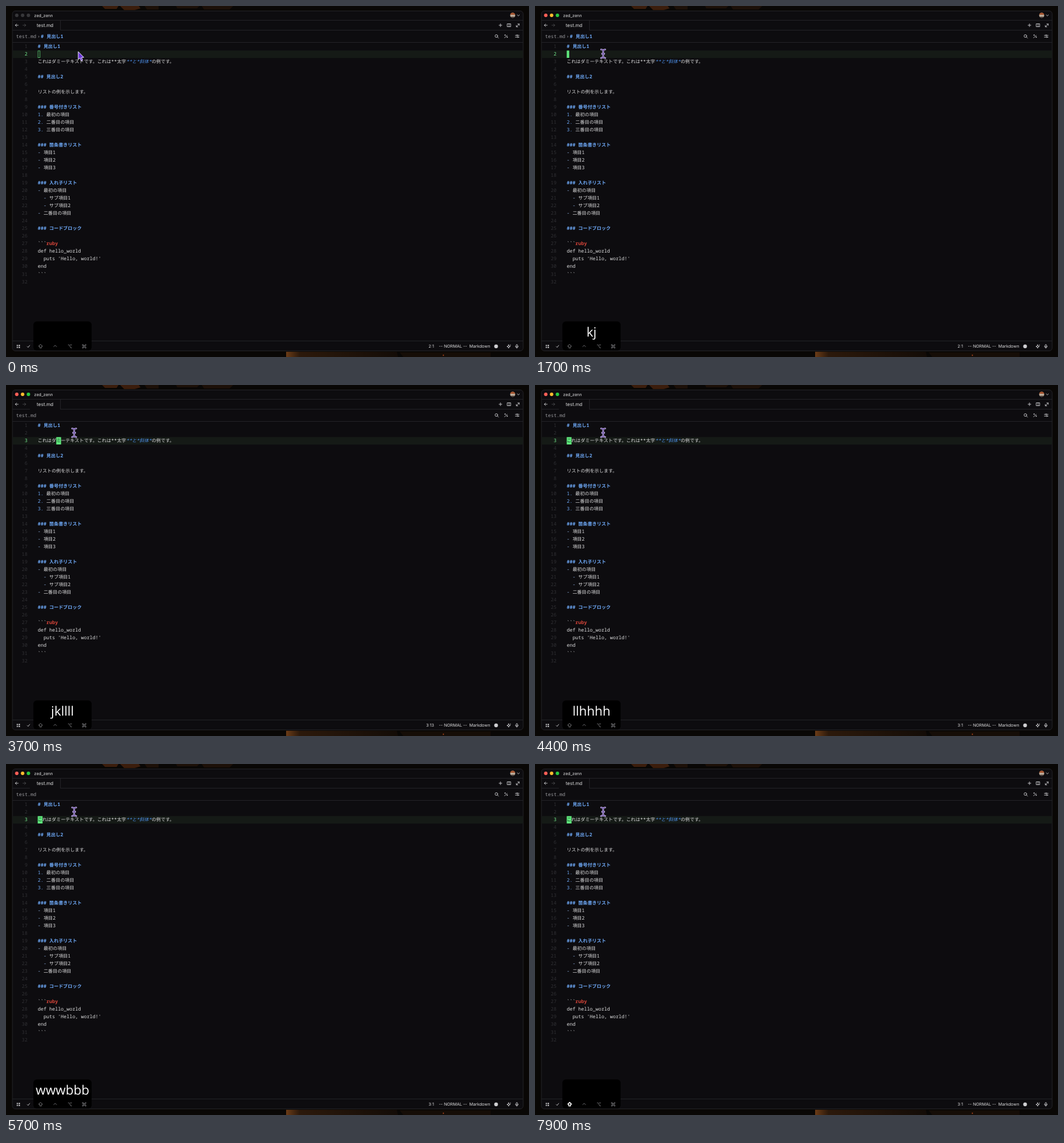
Recreate the animation shown at these times as an HTML page. Size 898 by 602 pixels, loop 8 s.

```html
<!DOCTYPE html>
<html lang="ja">
<head>
<meta charset="utf-8">
<title>Editor</title>
<style>
html, body { margin: 0; width: 100%; height: 100%; overflow: hidden; background: #090705; }
svg { display: block; width: 898px; height: 602px; }
text { white-space: pre; text-rendering: geometricPrecision; fill: #dededf; font: 7.2px Inter, sans-serif; }
.code { font: 8.25px "Noto Sans Mono", "Noto Sans CJK JP", monospace; }
.cjk { font-size: 7.95px; font-family: "Noto Sans CJK JP", "Noto Sans CJK", sans-serif; }
.head { fill: #6ea9f7; font-weight: 700; }
.mark { fill: #6ea9f7; }
.dash { fill: #92b4e4; }
.em { fill: #4d8fe8; font-style: italic; }
.lang { fill: #d6453a; font-weight: 600; }
.num { fill: #303034; text-anchor: end; }
.num.on { fill: #74e88d; }
.dim { fill: #98989c; }
.end { text-anchor: end; }
.under, .under * { fill: #10341b; }
#keys { font: 22px "Open Sans", "Noto Sans", sans-serif; fill: #fff; text-anchor: middle; }
.icon { fill: none; stroke: #cfcfd2; stroke-width: .9; stroke-linecap: round; stroke-linejoin: round; }
.mod { stroke: #77777a; }
.rule { stroke: #232327; stroke-width: 1; }
</style>
</head>
<body>
<svg viewBox="0 0 898 602">
  <defs>
    <linearGradient id="glow"><stop stop-color="#6b3c17"/><stop offset=".12" stop-color="#2c190b"/><stop offset="1" stop-color="#130c07"/></linearGradient>
  </defs>
  <rect width="898" height="602" fill="#090705"/>
  <path d="M165 0h28l-3 5h-20zM196 0h32l3 4-10 3h-18z" fill="#3b1d0c"/>
  <path d="M238 0h24v6h-20zM292 0h40l-4 4h-34zM336 0h54l-6 6h-44z" fill="#1c1008"/>
  <path d="M481 593h190l2 9h-192z" fill="url(#glow)"/>
  <path d="M676 594h156v8h-150z" fill="#150d07"/>
  <circle cx="751" cy="599" r="1.2" fill="#8a3a16"/>

  <rect x="11" y="8.5" width="877" height="583" rx="5" fill="#0d0c0f" stroke="#242428"/>
  <path class="rule" d="M11 24.5h877M11 41.5h30M93 41.5h795M93.5 25v16M11 62.5h877M11 574.5h877"/>
  <g id="lights"><circle cx="18.5" cy="16" r="3"/><circle cx="28.5" cy="16" r="3"/><circle cx="38.5" cy="16" r="3"/></g>
  <text x="48.3" y="18.6">zed_zenn</text>
  <text x="52.7" y="35.9" style="font-size:8.1px">test.md</text>
  <circle cx="870" cy="16" r="4.4" fill="#b9aa9a"/><path d="M865.7 15a4.4 4.4 0 0 1 8.6 0z" fill="#a5532d"/><path d="M866.5 18.5a4.4 4.4 0 0 0 7 0z" fill="#3b3330"/>
  <g class="icon">
    <path d="M877.8 15.2l1.9 1.8 1.9-1.8M21 33h-5m2.2-2.2L16 33l2.2 2.2"/>
    <path d="M29 33h5m-2.2-2.2L34 33l-2.2 2.2" stroke="#4b4b50"/>
    <path d="M846.5 33h5m-2.5-2.5v5M861 30.5h5.6v5H861zM863.8 30.5v5M876.2 35.8l5-5m-2.6 0h2.6v2.6m-5-.2v2.6h2.6"/>
    <circle cx="842" cy="51.5" r="2.3"/>
    <path d="M843.8 53.3l1.8 1.8M856 54.7l4.5-4.5M857 49.2v1.5m-.8-.8h1.5M860.6 52.6v1.5m-.8-.8h1.5M874.6 50.3h2m2 0h2.4M874.6 53.3h3m2 0h1.4"/>
    <circle cx="877.6" cy="50.3" r=".9"/><circle cx="878.8" cy="53.3" r=".9"/>
    <path d="M36.5 584l1.5 1.5 2.7-3.5"/>
    <path d="M863 581l.8 2.2 2.2.8-2.2.8-.8 2.2-.8-2.2-2.2-.8 2.2-.8zM866 581v1.4M875.9 581.8a1.2 1.2 0 0 1 2.4 0v1.6a1.2 1.2 0 0 1-2.4 0zM874.7 583.5a2.4 2.4 0 0 0 4.8 0M877.1 586v1"/>
  </g>
  <path d="M18.5 581.2h2v2h-2zM18.5 584.4h2v2h-2zM21.7 581.2h2.4v2h-2.4zM21.7 584.4h2.4v2h-2.4z" fill="#cfcfd2"/>
  <circle cx="841.5" cy="583.7" r="3.2" fill="#cfcfd2"/>
  <text class="code dim" x="17.3" y="54.6">test.md</text>
  <g id="crumb"></g>
  <text id="pos" class="end" x="735" y="586.2"></text>
  <text x="743.3" y="586.2">-- NORMAL --</text>
  <text x="795.6" y="586.2">Markdown</text>

  <rect id="active" x="11.5" width="876" height="13" fill="#151a16"/>
  <g id="doc"></g>
  <rect id="caret" height="12.6"/>
  <text id="under" class="code under"></text>

  <rect x="47" y="541" width="100" height="50" rx="6" fill="#000"/>
  <text id="keys" x="97" y="567.3"></text>
  <g class="icon mod">
    <path id="shift" d="M59.5 580.3l3.2 3.3h-1.7v2.9h-3v-2.9h-1.7z"/>
    <path d="M82 584.4l2.4-2.6 2.4 2.6M106.8 581.2h1.8l2.4 5h1.8M110.4 581.2h2.4"/>
    <path d="M133 582.4h2.6v2.6H133zM133 582.4h-1a1 1 0 1 1 1-1zM135.6 582.4v-1a1 1 0 1 1 1 1zM135.6 585h1a1 1 0 1 1-1 1zM133 585v1a1 1 0 1 1-1-1z"/>
  </g>
  <path id="arrow" d="M0 0v13.6l3.1-2.7 2 5 2.6-1.1-2.1-4.8 4-.2z" fill="#6b36d9" stroke="#efe9ff" stroke-width="1" stroke-linejoin="round"/>
  <g id="beam" fill="none" stroke-linecap="round">
    <path id="bar" d="M113.5 74.6q2.6 0 3.5 1.8 .9-1.8 3.5-1.8M117 76.4v11M113.5 89.2q2.6 0 3.5-1.8 .9 1.8 3.5 1.8M115 82h4" stroke="#d9c9f7" stroke-width="2.4"/>
    <use href="#bar"/>
    <path d="M113.5 74.6q2.6 0 3.5 1.8 .9-1.8 3.5-1.8M117 76.4v11M113.5 89.2q2.6 0 3.5-1.8 .9 1.8 3.5 1.8M115 82h4" stroke="#51338f" stroke-width="1.1"/>
  </g>
</svg>
<script>
const LOOP = 8000, FOCUS = 700, LEFT = 54.5, PITCH = 13.01, LATIN = 4.95, CJK = 7.95;
const $ = id => document.getElementById(id);
const set = (id, attrs) => { for (const k in attrs) $(id).setAttribute(k, attrs[k]); };
const show = (id, on) => $(id).style.display = on ? '' : 'none';

const lines = `# 見出し1

これはダミーテキストです。これは**太字**と*斜体*の例です。

## 見出し2

リストの例を示します。

### 番号付きリスト
1. 最初の項目
2. 二番目の項目
3. 三番目の項目

### 箇条書きリスト
- 項目1
- 項目2
- 項目3

### 入れ子リスト
- 最初の項目
  - サブ項目1
  - サブ項目2
- 二番目の項目

### コードブロック

\`\`\`ruby
def hello_world
  puts 'Hello, world!'
end
\`\`\`
`.split('\n');

const span = cls => s => `<tspan class="${cls}">${s}</tspan>`;
const wide = c => c > '\x7f';
const fonts = s => s.replace(/[^\x00-\x7f]+/g, span('cjk'));
const paint = s => fonts(s)
  .replace(/^#.*/, span('head'))
  .replace(/^\d\./, span('mark'))
  .replace(/^ *-/, span('dash'))
  .replace('ruby', span('lang'))
  .replace(/\*\*(<[^*]*>と<[^*]*>\*.*?\*)/, span('em'));
const baseline = row => 72.2 + PITCH * (row - 1);

$('doc').innerHTML = lines.map((s, i) => {
  const y = baseline(i + 1);
  return `<text class="code num" x="37" y="${y}">${i + 1}</text><text class="code" x="${LEFT}" y="${y}">${paint(s)}</text>`;
}).join('');
const numbers = document.querySelectorAll('.num');
$('crumb').innerHTML = `<text class="code dim" x="53.8" y="54.6">›</text><text class="code" x="59.8" y="54.6">${paint(lines[0])}</text>`;

// time, key, row, column after the key
const strokes = [
  [FOCUS, '', 2, 0], [1300, 'k', 1, 0], [1600, 'j', 2, 0], [2000, 'j', 3, 0], [2300, 'j', 4, 0], [2600, 'k', 3, 0],
  [3000, 'l', 3, 1], [3200, 'l', 3, 2], [3400, 'l', 3, 3], [3600, 'l', 3, 4],
  [3900, 'h', 3, 3], [4050, 'h', 3, 2], [4200, 'h', 3, 1], [4350, 'h', 3, 0],
  [4600, 'w', 3, 12], [4750, 'w', 3, 13], [4950, 'w', 3, 16],
  [5300, 'b', 3, 13], [5500, 'b', 3, 12], [5700, 'b', 3, 0], [5900, 'b', 2, 0], [6900, 'j', 3, 0]
];
const CLEAR = 7700, SHIFT = 7800;

function draw(t) {
  const focused = t >= FOCUS;
  const done = strokes.filter(s => s[0] <= t);
  const [last, , row, col] = done.at(-1) || strokes[0];
  const line = lines[row - 1], char = line[col] || '';
  const before = [...line.slice(0, col)];
  const x = before.reduce((sum, c) => sum + (wide(c) ? CJK : LATIN), LEFT);
  const bytes = before.reduce((sum, c) => sum + (wide(c) ? 3 : 1), 1);
  const top = 76.2 + PITCH * (row - 2);
  const lit = !focused || Math.floor((t - last) / 500) % 2 === 0;

  ['#ff5f57', '#febc2e', '#28c840'].forEach((c, i) =>
    $('lights').children[i].setAttribute('fill', focused ? c : '#37373a'));
  set('active', { y: top });
  numbers.forEach((n, i) => n.classList.toggle('on', i === row - 1));
  show('crumb', row < 3);
  $('pos').textContent = `${row}:${bytes}`;

  const inset = focused ? 0 : .5;
  set('caret', {
    x: x + inset, y: top + .2 + inset, height: 12.6 - 2 * inset,
    width: (wide(char) ? CJK + .3 : LATIN - (char ? 0 : .7)) - 2 * inset,
    fill: focused ? '#5fe87c' : 'none', stroke: focused ? 'none' : '#4fae63'
  });
  show('caret', lit);
  show('under', lit && focused);
  set('under', { x, y: baseline(row) });
  $('under').style.fontWeight = row === 1 ? 700 : 400;
  $('under').innerHTML = fonts(char);

  $('keys').textContent = t < CLEAR ? done.map(s => s[1]).join('').slice(-6) : '';
  const held = t >= SHIFT;
  $('shift').style.cssText = held ? 'stroke:#fff;stroke-width:1.5' : '';

  const move = Math.min(1, Math.max(0, (t - 300) / 400));
  set('arrow', { transform: `translate(${124 - 7 * move} ${78.3 + 3.7 * move})` });
  show('arrow', !focused);
  show('beam', focused);
}

const start = performance.now();
function tick() {
  draw((performance.now() - start) % LOOP);
  requestAnimationFrame(tick);
}
tick();
</script>
</body>
</html>
```
